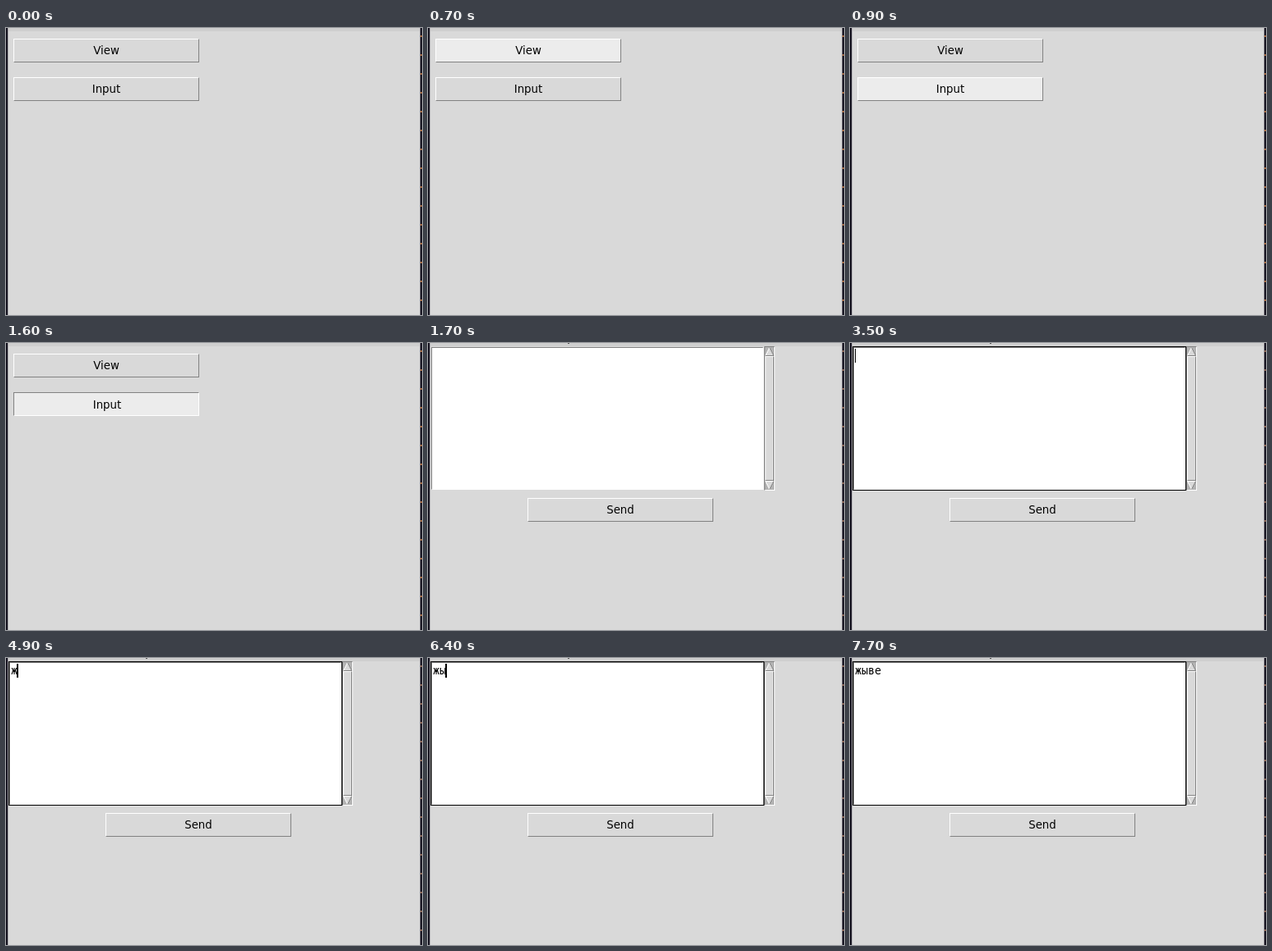
An HTML page that plays this animation: 506x350 px, repeating every 8000 ms.

```html
<!DOCTYPE html>
<html lang="en">
<head>
<meta charset="utf-8">
<style>
  html, body { margin: 0; width: 100%; height: 100%; overflow: hidden; background: #d9d9d9; }
  body { font: 13.33px/17px "DejaVu Sans", sans-serif; color: #000; }
  body, body * { box-sizing: border-box; }
  div, svg { position: absolute; }
  [hidden] { display: none; }

  .titlebar { left: 0; top: 0; width: 506px; height: 4px; background: #cfcfcf; }
  .descender { left: 170px; top: 0; width: 2px; height: 1px; background: #555; }
  .left-edge { left: 0; top: 0; width: 3px; height: 350px; background: #15131f; border-right: 1px solid #aaa9ad; }
  .right-edge {
    left: 503px; top: 0; width: 3px; height: 350px; border-left: 1px solid #aaa9ad;
    background: repeating-linear-gradient(#15131f 0 9px, var(--mark) 9px 11px, #15131f 11px 23px);
  }

  .raised { border: 1px solid; border-color: #fff #828282 #828282 #fff; background: #d9d9d9; }
  .sunken { border: 1px solid; border-color: #828282 #fff #fff #828282; }
  .button { width: 226px; height: 29px; padding-top: 5px; text-align: center; }
  .hover { background: #ececec; }
  .pressed { border-color: #828282 #fff #fff #828282; padding: 6px 0 0 2px; }

  .field { left: 3px; top: 4px; width: 406px; height: 176px; border: 1px solid #d9d9d9; }
  .focus { border-color: #000; }
  .paper { inset: 0; background: #fff; }
  .line { left: 6px; top: 7px; width: 400px; height: 17px; overflow: hidden; }
  .typed { white-space: pre; font-family: "DejaVu Sans Mono", monospace; }
  .caret { top: 0; width: 2px; height: 17px; background: #000; }
  .scrollbar { left: 409px; top: 4px; width: 13px; height: 176px; background: #b3b3b3; }
  .thumb { left: 0; top: 11px; width: 11px; height: 152px; }
  .arrows { left: 0; top: 0; }
</style>
</head>
<body>
  <div class="titlebar"></div>
  <div class="left-edge"></div>
  <div class="right-edge" id="edge"></div>

  <div id="menu">
    <div class="button raised" id="view" style="left:9px;top:13px">View</div>
    <div class="button raised" id="input" style="left:9px;top:60px">Input</div>
  </div>

  <div id="editor" hidden>
    <div class="descender"></div>
    <div class="field" id="field"><div class="paper sunken"></div></div>
    <div class="line">
      <div class="caret" id="caret"></div>
      <div class="typed" id="typed"></div>
    </div>
    <div class="scrollbar sunken">
      <svg class="arrows" width="11" height="174" fill="#d9d9d9">
        <path d="M5.5 0L11 11H0ZM0 163H11L5.5 174Z"/>
        <path d="M5.5 .5L.5 10.5M5.5 173.5L.5 163.5H10.5" fill="none" stroke="#fff"/>
        <path d="M5.5 .5L10.5 10.5H.5M10.5 163.5L5.5 173.5" fill="none" stroke="#828282"/>
      </svg>
      <div class="thumb raised"></div>
    </div>
    <div class="button raised" style="left:121px;top:189px">Send</div>
  </div>

<script>
  const LOOP = 8000;
  const TEXT = "жыве ";
  const KEY_TIMES = [4900, 6400, 6700, 7000, 7200];
  const CARET_ON = [[2600, 3200], [3500, 4100], [4300, 5000], [5300, 5900], [6200, 6800], [7100, 7700]];
  const CHAR_WIDTH = 8;

  const [menu, view, input, editor, field, caret, typed, edge] =
    ["menu", "view", "input", "editor", "field", "caret", "typed", "edge"].map(id => document.getElementById(id));
  const within = (t, from, to) => t >= from && t < to;

  function render(t) {
    const editing = t >= 1700;
    menu.hidden = editing;
    editor.hidden = !editing;
    edge.style.setProperty("--mark", editing ? "#8a6352" : "#a5683f");

    view.classList.toggle("hover", within(t, 700, 800));
    input.classList.toggle("hover", within(t, 900, 1700));
    input.classList.toggle("pressed", within(t, 1600, 1700));

    const count = KEY_TIMES.filter(time => t >= time).length;
    field.classList.toggle("focus", t >= 2600);
    typed.textContent = TEXT.slice(0, count);
    caret.style.left = count * CHAR_WIDTH - 1 + "px";
    caret.hidden = !CARET_ON.some(([from, to]) => within(t, from, to));
  }

  const start = performance.now();
  function tick() {
    render((performance.now() - start) % LOOP);
    requestAnimationFrame(tick);
  }
  tick();
</script>
</body>
</html>
```
